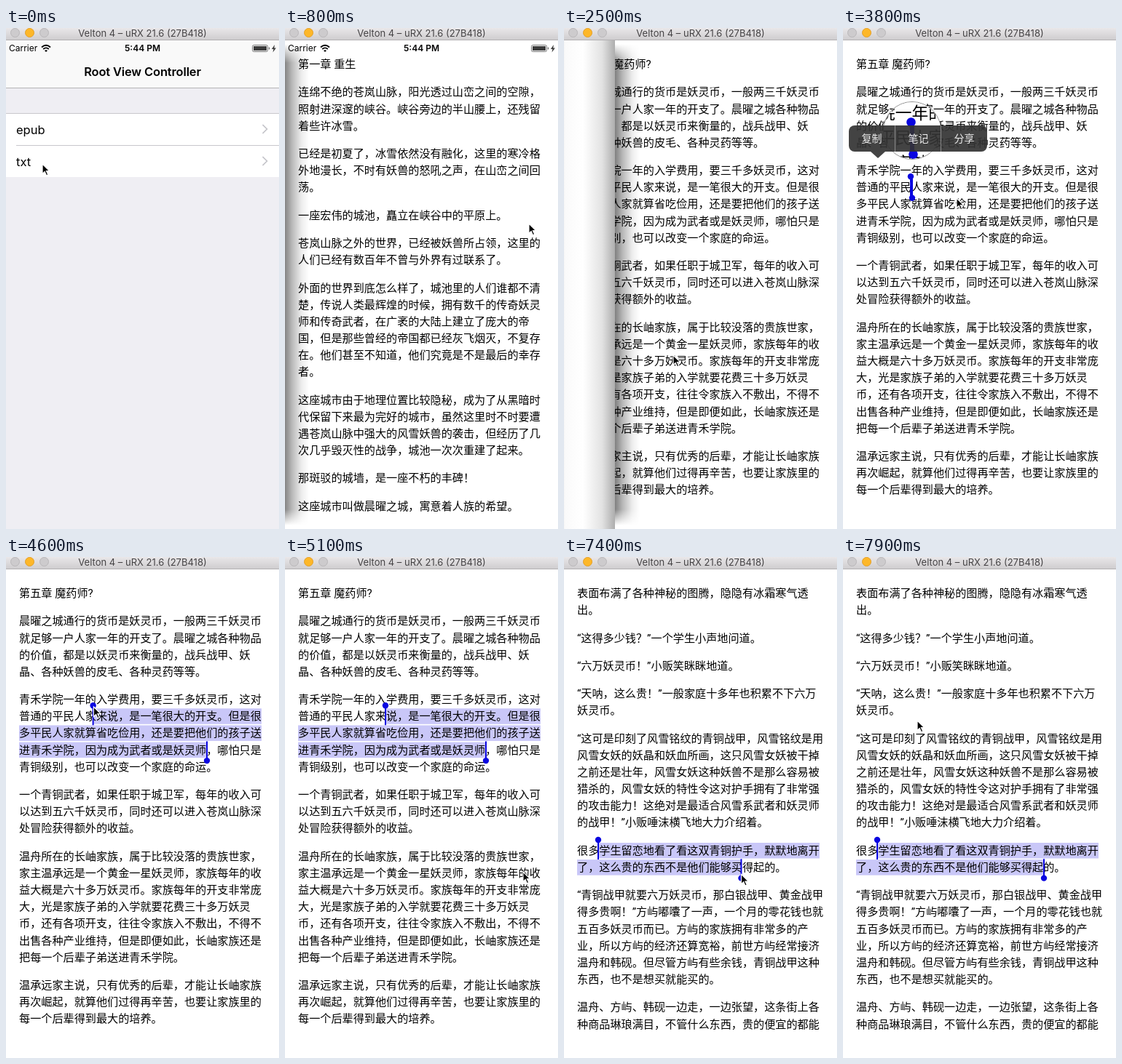
An HTML page that plays this animation: 375 px wide and 689 px high, repeating every 8000 ms.

```html
<!DOCTYPE html>
<html lang="zh-CN">
<head>
<meta charset="utf-8">
<title>Reader</title>
<style>
html, body { margin: 0; width: 100%; height: 100%; overflow: hidden; background: #fff; }
#stage { position: relative; width: 375px; height: 689px; overflow: hidden; background: #fff;
  font: 12px/20px Inter, Roboto, "Noto Sans CJK SC", "Noto Sans CJK", sans-serif; color: #000; }
#stage div, #stage svg { position: absolute; }
.full { left: 0; top: 0; width: 375px; height: 689px; }
.page { background: #fff; overflow: hidden; }
.line { left: 18px; height: 23px; white-space: pre; text-spacing-trim: space-all;
  font: 15.13px/23px Roboto, "Noto Sans CJK SC", "Noto Sans CJK", sans-serif; }
.list { background: #efeef3; }
.nav { left: 0; top: 17px; width: 375px; height: 65px; background: #f9f9f9; border-bottom: 1px solid #b4b4b6; }
.nav div { left: 0; width: 375px; top: 33px; text-align: center; font-size: 16.4px; font-weight: 600; letter-spacing: -.1px; }
.row { left: 0; width: 375px; height: 44px; background: #fff; font-size: 16.5px; line-height: 44px; text-indent: 14px; }
.rule { height: 1px; right: 0; background: #c8c7cc; }
#title { left: 0; top: 0; width: 375px; height: 17px; background: linear-gradient(#e9e7e9, #cfcdcf);
  border-bottom: 1px solid #b3b1b3; box-sizing: border-box; }
#title div { left: 0; width: 375px; top: -3px; text-align: center; font-size: 13px; color: #454345; }
#title i { position: absolute; top: 0; width: 11px; height: 11px; border-radius: 50%;
  background: #cdcbcd; border: 1px solid #b9b7b9; }
#status span { position: absolute; top: 18px; white-space: nowrap; }
#shade { top: 22px; height: 662px; width: 34px;
  background: linear-gradient(90deg, rgba(0,0,0,.5), rgba(0,0,0,.27) 32%, rgba(0,0,0,.07) 70%, transparent);
  -webkit-mask: linear-gradient(transparent, #000 26px 640px, transparent);
  mask: linear-gradient(transparent, #000 26px 640px, transparent); }
#roll { top: 17px; height: 672px;
  background: linear-gradient(90deg, #c4c4c4, #fafafa 14%, #fff 45%, #e2e2e2 78%, #adadad); }
.bar { left: 0; width: 375px; background: rgba(0,0,0,.88); color: #fff; }
.bar div { white-space: nowrap; }
#lens { width: 78px; height: 78px; border: 1px solid #8c8c8c; border-radius: 50%; overflow: hidden; background: #fff; }
#lens .zoom { left: 0; top: 0; transform-origin: 0 0; }
#popup { width: 190px; height: 36px; border-radius: 8px; background: rgba(52,52,52,.92); color: #eee; }
#popup div { top: 0; height: 36px; width: 63px; line-height: 36px; text-align: center; font-size: 14px; }
#popup div + div { border-left: 1px solid #8a8a8a; }
#popup svg { left: 30px; top: 36px; }
</style>
</head>
<body>
<div id="stage"></div>
<script>
const STEP = 23.15, GAP = 38.35, LEFT = 18, RIGHT = 351, LOOP = 8000;
const stage = document.getElementById('stage');

function add(parent, html) {
  parent.insertAdjacentHTML('beforeend', html);
  return parent.lastElementChild;
}

// "/" breaks a line, a new row starts a paragraph
const texts = [
`第一章 重生
连绵不绝的苍岚山脉，阳光透过山峦之间的空隙，/照射进深邃的峡谷。峡谷旁边的半山腰上，还残留/着些许冰雪。
已经是初夏了，冰雪依然没有融化，这里的寒冷格/外地漫长，不时有妖兽的怒吼之声，在山峦之间回/荡。
一座宏伟的城池，矗立在峡谷中的平原上。
苍岚山脉之外的世界，已经被妖兽所占领，这里的/人们已经有数百年不曾与外界有过联系了。
外面的世界到底怎么样了，城池里的人们谁都不清/楚，传说人类最辉煌的时候，拥有数千的传奇妖灵/师和传奇武者，在广袤的大陆上建立了庞大的帝/国，但是那些曾经的帝国都已经灰飞烟灭，不复存/在。他们甚至不知道，他们究竟是不是最后的幸存/者。
这座城市由于地理位置比较隐秘，成为了从黑暗时/代保留下来最为完好的城市，虽然这里时不时要遭/遇苍岚山脉中强大的风雪妖兽的袭击，但经历了几/次几乎毁灭性的战争，城池一次次重建了起来。
那斑驳的城墙，是一座不朽的丰碑！
这座城市叫做晨曜之城，寓意着人族的希望。`,
`青禾学院，武者初级班。
三十多个学员正襟危坐，听一个女老师传授妖灵知/识，他们都是一群武者学徒，晨曜之城青禾学院的/学员。
“听说新来的这位顾老师来自云阙世家，是一位白银/三星妖灵师！”几个学员小声地议论着。
众学员的目光聚焦在了那位顾老师的身上，她身材/高挑火辣，穿着粉色的裙子，酥胸高耸，脸上化了/浓妆，脸上神情高傲，嘴角微撇着，眼睛斜视，不/屑冷冷的双臂半搭着，拒人于千里之外的冷漠，眼/角和眉梢都染上妩媚的高傲。云阙世家是晨曜之城/三大巅峰世家之一，顾宁出身高贵，又是白银三星/妖灵师，自然有高傲的资本。
三十岁达到白银三星妖灵师境界，要不是她的侄子/顾川在这个班里，她是不会过来任教的。
“妖灵师和武者都有五个等级，分别是青铜、白银、/黄金、黑金、传奇五个级别，每个级别又分五个星/级。”
“妖灵师是凌驾于武者之上，真正高贵的存在，妖灵/师可以在丹田之中形成灵魂海，将捕获的妖灵纳入/丹田。在战斗的时候，就可以催动妖灵附体，拥有/强大无匹的力量，这种力量是同阶武者远远无法匹/敌的。”顾宁娓娓说道，“就像我，我的妖灵是烈焰`,
`第五章 魔药师?
晨曜之城通行的货币是妖灵币，一般两三千妖灵币/就足够一户人家一年的开支了。晨曜之城各种物品/的价值，都是以妖灵币来衡量的，战兵战甲、妖/晶、各种妖兽的皮毛、各种灵药等等。
青禾学院一年的入学费用，要三千多妖灵币，这对/普通的平民人家来说，是一笔很大的开支。但是很/多平民人家就算省吃俭用，还是要把他们的孩子送/进青禾学院，因为成为武者或是妖灵师，哪怕只是/青铜级别，也可以改变一个家庭的命运。
一个青铜武者，如果任职于城卫军，每年的收入可/以达到五六千妖灵币，同时还可以进入苍岚山脉深/处冒险获得额外的收益。
温舟所在的长岫家族，属于比较没落的贵族世家，/家主温承远是一个黄金一星妖灵师，家族每年的收/益大概是六十多万妖灵币。家族每年的开支非常庞/大，光是家族子弟的入学就要花费三十多万妖灵/币，还有各项开支，往往令家族入不敷出，不得不/出售各种产业维持，但是即便如此，长岫家族还是/把每一个后辈子弟送进青禾学院。
温承远家主说，只有优秀的后辈，才能让长岫家族/再次崛起，就算他们过得再辛苦，也要让家族里的/每一个后辈得到最大的培养。`,
`表面布满了各种神秘的图腾，隐隐有冰霜寒气透/出。
“这得多少钱？”一个学生小声地问道。
“六万妖灵币！”小贩笑眯眯地道。
“天呐，这么贵！”一般家庭十多年也积累不下六万/妖灵币。
“这可是印刻了风雪铭纹的青铜战甲，风雪铭纹是用/风雪女妖的妖晶和妖血所画，这只风雪女妖被干掉/之前还是壮年，风雪女妖这种妖兽不是那么容易被/猎杀的，风雪女妖的特性令这对护手拥有了非常强/的攻击能力！这绝对是最适合风雪系武者和妖灵师/的战甲！”小贩唾沫横飞地大力介绍着。
很多学生留恋地看了看这双青铜护手，默默地离开/了，这么贵的东西不是他们能够买得起的。
“青铜战甲就要六万妖灵币，那白银战甲、黄金战甲/得多贵啊！”方屿嘟囔了一声，一个月的零花钱也就/五百多妖灵币而已。方屿的家族拥有非常多的产/业，所以方屿的经济还算宽裕，前世方屿经常接济/温舟和韩砚。但尽管方屿有些余钱，青铜战甲这种/东西，也不是想买就能买的。
温舟、方屿、韩砚一边走，一边张望，这条街上各/种商品琳琅满目，不管什么东西，贵的便宜的都能`];

function textPage(text) {
  let y = 50, lines = '';
  for (const para of text.split('\n')) {
    for (const s of para.split('/')) {
      lines += `<div class="line" style="top:${(y - 11).toFixed(2)}px">${s}</div>`;
      y += STEP;
    }
    y += GAP - STEP;
  }
  return `<div class="full page"><svg class="full marks"></svg>${lines}<svg class="full grips"></svg></div>`;
}

const chevron = y => `<svg class="full"><path d="M352.500 ${y - 6}l6 6-6 6" fill="none" stroke="#c4c4c9" stroke-width="1.700"/></svg>`;
const listPage = `<div class="full page list">
  <div class="nav"><div>Root View Controller</div></div>
  <div class="row" style="top:118px">epub</div><div class="row" id="tap" style="top:162px;height:43px">txt</div>
  <div class="rule" style="left:0;top:117px"></div><div class="rule" style="left:14px;top:161px"></div>
  ${chevron(139)}${chevron(183)}</div>`;

const battery = (fill, line) => `<svg class="full" fill="${fill}">
  <rect x="338.500" y="23.500" width="21" height="9" rx="2" fill="none" stroke="${line}"/>
  <rect x="340" y="25" width="18" height="6"/><path d="M361 26q2 2 0 4z"/>
  <path d="M369 23l-4 6h2.500l-1 4.500 4.500-6h-2.600z"/></svg>`;

const pages = [listPage, ...texts.map(textPage)].map(html => add(stage, html));
const shade = add(stage, '<div id="shade"></div>');
const roll = add(stage, '<div id="roll"></div>');
const status = add(stage, `<div class="full" id="status">
  <span style="left:4px">Carrier</span><span style="left:163px;font-weight:600">5:44 PM</span>
  <svg class="full" fill="none" stroke="#000" stroke-width="1.800"><path d="M49 26.500q6-5.500 12 0M51.200 29q3.800-3.200 7.600 0"/>
  <path d="M53 31l2 2 2-2q-2-1.500-4 0z" fill="#000" stroke="none"/></svg>
  ${battery('#3c3c3c', '#777')}</div>`);

const topBar = add(stage, `<div class="bar" style="top:17px;height:65px">
  <svg class="full" style="top:-17px" fill="none" stroke="#fff" stroke-width="2.400">
  <path d="M33 60H15M23 51l-9 9 9 9"/><path d="M345 46h12v27l-6-5-6 5z" fill="#fff" stroke="none"/></svg>
  <div class="full" style="top:-17px">${battery('#e8e8e8', '#fff')}</div></div>`);

const label = (x, y, s) => `<div style="left:${x}px;top:${y - 10}px">${s}</div>`;
const rays = [0, 1, 2, 3, 4, 5, 6, 7].map(i =>
  `<path d="M187 56v-3" transform="rotate(${i * 45} 187 66)" stroke-linecap="round"/>`).join('');
const cells = [[303, 56], [315, 56], [303, 68], [315, 68]].map(([x, y]) =>
  `<rect x="${x}" y="${y}" width="9" height="9" rx="1"/>`).join('');
const lowBar = add(stage, `<div class="bar" style="top:577px;height:112px">
  <svg class="full" style="height:112px" fill="none" stroke="#fff" stroke-width="1.400">
  <path d="M66 26.500H123" stroke="#9a9af4" stroke-width="2"/><circle cx="123" cy="26" r="9" fill="#fff" stroke="none"/>
  <path d="M51 57h2m3 0h15M51 66h2m3 0h15M51 75h2m3 0h15"/>
  <circle cx="187" cy="66" r="5.500"/>${rays}${cells}</svg>
  ${label(16, 27, '上一章')}${label(321, 27, '下一章')}
  ${label(49, 94, '目录')}${label(175, 94, '亮度')}${label(301, 94, '设置')}</div>`);

const lens = add(stage, '<div id="lens"></div>');
const zooms = [3, 4].map(i => {
  const box = add(lens, '<div class="zoom full"></div>');
  add(box, textPage(texts[i - 1]));
  return box;
});
const popup = add(stage, `<div id="popup"><div style="left:0">复制</div><div style="left:63px">笔记</div>
  <div style="left:126px">分享</div><svg width="20" height="9"><path d="M0 0h20l-10 9z" fill="rgba(52,52,52,.92)"/></svg></div>`);
add(stage, `<div id="title"><div>Velton 4 – uRX 21.6 (27B418)</div>
  <i style="left:6px"></i><i style="left:26px;background:#fdb729;border-color:#e3a02a"></i><i style="left:46px"></i></div>`);
const cursor = add(stage, `<svg width="14" height="20" style="left:0;top:0;overflow:visible">
  <path d="M0 0V13.500l3.200-3 2.300 5.300 2.300-1-2.300-5.100H9.800z" stroke="#fff" stroke-width="1.200"/></svg>`);

// start, duration, page index turned to
const turns = [[340, 600, 1], [1000, 500, 2], [2150, 550, 3], [5250, 600, 4]];

const mouse = [[300, 50, 187], [800, 335, 269], [1000, 335, 269], [1400, 190, 360], [1550, 190, 360],
  [1700, 60, 643], [1900, 60, 643], [2200, 150, 450], [2500, 150, 450], [3050, 94, 212], [3600, 94, 212],
  [3800, 156, 234], [4000, 95, 234], [4350, 276, 278], [4500, 95, 206], [4680, 138, 206],
  [5100, 327, 433], [5250, 327, 433], [5700, 200, 420], [6300, 52, 398], [6950, 52, 398],
  [7100, 64, 416], [7500, 276, 440], [7900, 102, 225]];

const picks = [
  { page: 3, show: 3600, press: 3100, lift: 3900, drag: 4000, focus: [94, 212],
    from: [[4500, 93, 219.3], [4680, 138, 219.3]], to: [[4000, 95, 219.3], [4350, 276, 265.6]] },
  { page: 4, show: 6900, press: 6500, lift: 7000, drag: 7100, focus: [50, 397],
    from: [[6900, 47, 404]], to: [[7100, 64, 404], [7500, 276, 427.150]] }];

const clamp = v => Math.max(0, Math.min(1, v));
const ease = v => (v = clamp(v), v * v * (3 - 2 * v));
const show = (el, on) => { el.style.display = on ? '' : 'none'; };
const move = (el, x, y) => { el.style.transform = `translate(${x}px,${y}px)`; };

function track(keys, t) {
  let a = keys[0];
  for (const b of keys) {
    if (t < b[0]) {
      const k = ease((t - a[0]) / (b[0] - a[0]));
      return [a[1] + (b[1] - a[1]) * k, a[2] + (b[2] - a[2]) * k];
    }
    a = b;
  }
  return [a[1], a[2]];
}

function drawTurn(t) {
  let now = 0, old = -1, fold = -100;
  for (const [start, span, page] of turns) {
    if (t < start) break;
    old = t < start + span ? now : -1;
    fold = 375 - 435 * ease((t - start) / span);
    now = page;
  }
  pages.forEach((p, i) => {
    show(p, i === now || i === old);
    p.style.zIndex = i === old ? 1 : 0;
    p.style.clipPath = i === old ? `inset(0 ${Math.min(375, 375 - fold)}px 0 0)` : 'none';
  });
  const width = Math.min(80, (375 - fold) / 2);
  for (const el of [shade, roll]) {
    show(el, old >= 0);
    el.style.zIndex = 2;
  }
  shade.style.left = fold + 'px';
  roll.style.left = fold - width + 'px';
  roll.style.width = width + 'px';
}

function drawPick(pick, i, t) {
  let marks = '', grips = '';
  if (t >= pick.show) {
    const [x1, y1] = track(pick.from, t), [x2, y] = track(pick.to, t);
    const rows = Math.round((y - y1) / STEP), y2 = y1 + rows * STEP;
    for (let r = 0; r <= rows; r++) {
      const a = r ? LEFT : x1, b = r < rows ? RIGHT : x2;
      marks += `<rect x="${a}" y="${y1 + r * STEP - 11}" width="${Math.max(0, b - a)}" height="21.500"/>`;
    }
    grips = `<path d="M${x1} ${y1 - 15}v27M${x2} ${y2 - 12}v27" stroke="#0a06e0" stroke-width="2"/>
      <circle cx="${x1}" cy="${y1 - 15}" r="4.200"/><circle cx="${x2}" cy="${y2 + 14.500}" r="4.200"/>`;
  }
  if (pick.last !== marks + grips) {
    pick.last = marks + grips;
    for (const root of [pages[pick.page], zooms[i]]) {
      root.querySelector('.marks').innerHTML = `<g fill="#c9c7f8">${marks}</g>`;
      root.querySelector('.grips').innerHTML = `<g fill="#0a06e0">${grips}</g>`;
    }
  }
  const pressed = t >= pick.press && t < pick.lift, [fx, fy] = pick.focus;
  show(zooms[i], pressed);
  if (pressed) {
    zooms[i].style.transform = `translate(${39 - fx * 1.5}px,${39 - fy * 1.5}px) scale(1.5)`;
    lens.style.left = fx - 39 + 'px';
    lens.style.top = fy - 111 + 'px';
  }
  const open = t >= pick.show && t < pick.drag;
  if (open) {
    popup.style.left = '8px';
    popup.style.top = pick.from[0][2] - 85 + 'px';
  }
  return [pressed, open];
}

function draw(t) {
  drawTurn(t);
  document.getElementById('tap').style.background = t > 150 ? '#d9d9d9' : '#fff';
  show(status, t < 950 || (t >= 1500 && t < 2100));
  const bars = ease((t - 1500) / 150) - ease((t - 1950) / 150);
  show(topBar, bars > 0);
  show(lowBar, bars > 0);
  move(topBar, 0, -65 * (1 - bars));
  move(lowBar, 0, 112 * (1 - bars));
  const states = picks.map((p, i) => drawPick(p, i, t));
  show(lens, states.some(s => s[0]));
  show(popup, states.some(s => s[1]));
  move(cursor, ...track(mouse, t));
}

['#status', '.bar', '#lens', '#popup', '#title'].forEach((q, i) =>
  stage.querySelectorAll(q).forEach(el => { el.style.zIndex = 3 + i; }));
cursor.style.zIndex = 9;

const began = performance.now();
function tick() {
  draw((performance.now() - began) % LOOP);
  requestAnimationFrame(tick);
}
tick();
</script>
</body>
</html>
```
